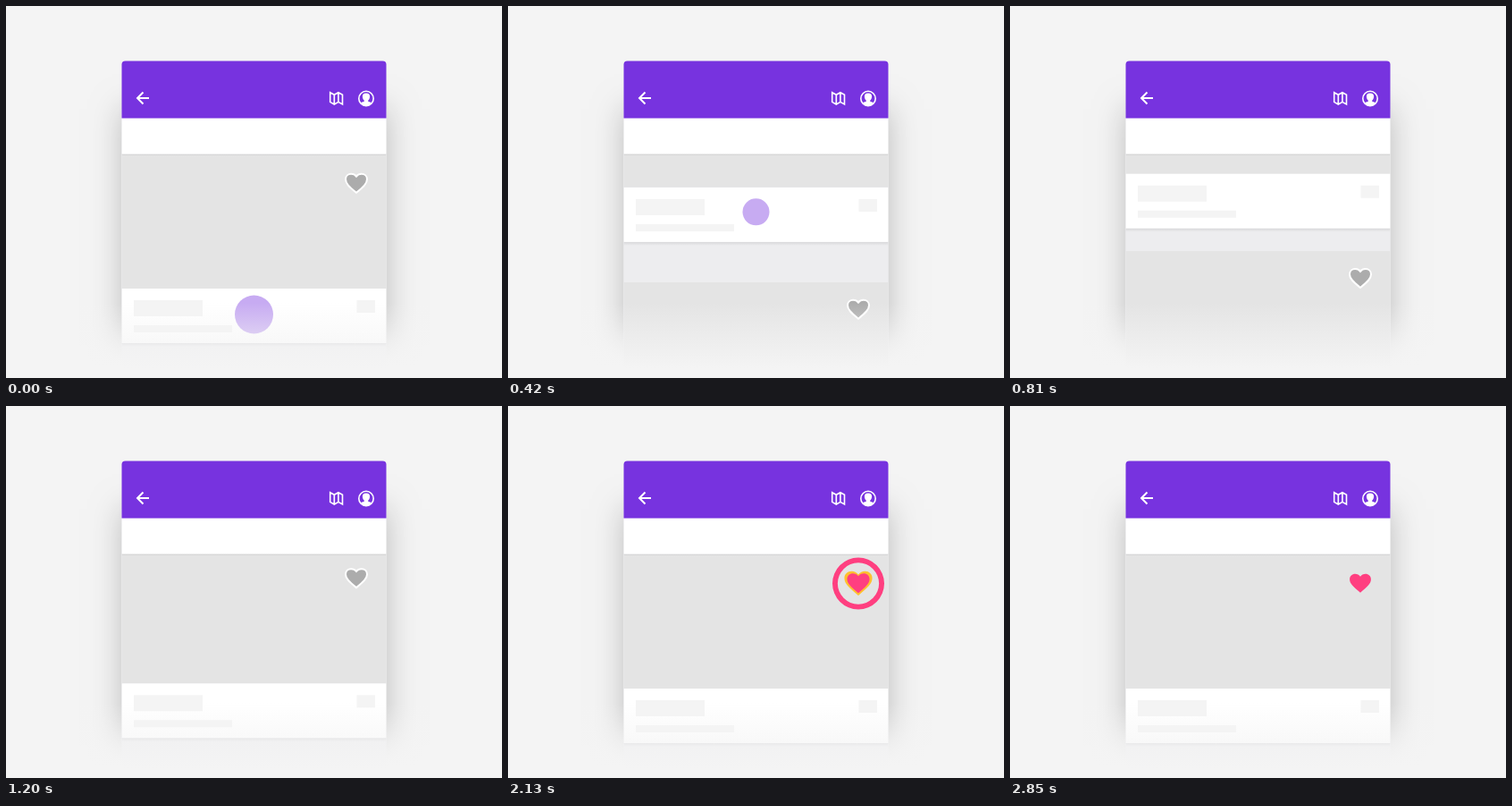
An HTML page with a canvas for the animation above (3630 ms loop, 555 px wide and 416 px high).

```html
<!DOCTYPE html>
<html lang="en">
<head>
<meta charset="utf-8">
<title>Like a card</title>
<style>
html, body { margin: 0; height: 100%; overflow: hidden; background: #f4f4f4; }
canvas { display: block; }
</style>
</head>
<body>
<canvas id="stage" width="555" height="416"></canvas>
<script>
const ctx = document.getElementById('stage').getContext('2d');
const LOOP = 3630, LEFT = 129.5, WIDTH = 296;
const PURPLE = '#7733df', PINK = '#ff3f80', YELLOW = '#ffc02e';
const HEART = { x: 392, y: 198 };
const heartPath = new Path2D('M0 10.8C-8 4-12 .6-12-4.2C-12-7.8-9.2-10.2-5.8-10.2C-3.5-10.2-1.3-9.1 0-7.4' +
  'C1.3-9.1 3.5-10.2 5.8-10.2C9.2-10.2 12-7.8 12-4.2C12 .6 8 4 0 10.8Z');

const ramp = (t, a, b) => Math.min(1, Math.max(0, (t - a) / (b - a)));
const ease = (t, a, b) => (1 - Math.cos(Math.PI * ramp(t, a, b))) / 2;
const easeOut = (t, a, b) => 1 - (1 - ramp(t, a, b)) ** 3;
const pop = t => t < 0 ? 0 : 1 - Math.exp(-0.006 * t) * Math.cos(0.015 * t);

// Dragged up, held, then released on a spring that overshoots slightly
function scroll(t) {
  if (t < 715) return -155 * ease(t, 157, 562);
  if (t > 1440) return 2 * (1 - ease(t, 1440, 1620));
  const u = t - 715, w = Math.PI / 725, d = 0.00604;
  return -155 * Math.exp(-d * u) * (Math.cos(w * u) + d / w * Math.sin(w * u));
}

function box(color, x, y, w, h) {
  ctx.fillStyle = color;
  ctx.fillRect(x, y, w, h);
}

function disc(x, y, r, color, alpha = 1) {
  ctx.globalAlpha = alpha;
  ctx.fillStyle = color;
  ctx.beginPath();
  ctx.arc(x, y, r, 0, 7);
  ctx.fill();
  ctx.globalAlpha = 1;
}

function heart(x, y, scale, color, outlined) {
  if (scale <= 0) return;
  ctx.save();
  ctx.translate(x, y);
  ctx.scale(scale, scale);
  ctx.fillStyle = color;
  ctx.fill(heartPath);
  if (outlined) {
    ctx.strokeStyle = '#fff';
    ctx.lineWidth = 2;
    ctx.stroke(heartPath);
  }
  ctx.restore();
}

function softEdge(y, size, alpha) {
  const g = ctx.createLinearGradient(0, y, 0, y + size);
  g.addColorStop(0, `rgba(0,0,0,${alpha})`);
  g.addColorStop(1, 'rgba(0,0,0,0)');
  box(g, LEFT, y, WIDTH, size);
}

function card(top, heartDrop, heartScale) {
  box('#e4e4e4', LEFT, top, WIDTH, 150);
  heart(HEART.x, top + heartDrop, heartScale, '#acacac', true);
  const y = top + 150;
  box('#fff', LEFT, y, WIDTH, 61);
  box('#f4f4f4', 143, y + 13, 77, 18);
  box('#f4f4f4', 143, y + 41, 110, 8);
  box('#f4f4f4', 392.5, y + 13, 20.5, 14);
  softEdge(y + 61, 4, 0.09);
}

function icons() {
  ctx.strokeStyle = '#fff';
  ctx.lineWidth = 2;
  ctx.stroke(new Path2D('M160 103H147.5M153.5 96.5L147 103L153.5 109.5'));
  ctx.lineWidth = 1.6;
  ctx.stroke(new Path2D('M362.7 96.7L367.3 99.3L371.9 96.7L376.5 99.3V110L371.9 107.4L367.3 110L362.7 107.4ZM367.3 99.3V110M371.9 96.7V107.4'));
  ctx.beginPath();
  ctx.arc(403, 103.5, 8.2, 0, 7);
  ctx.stroke();
  ctx.save();
  ctx.clip();
  ctx.fillStyle = '#fff';
  ctx.fill(new Path2D('M403 97.5C399.4 97.5 398.6 99.8 399 102.3C399.3 104.2 400.2 105.2 401 106C400.8 107.6 396.5 107.4 394.5 109.5V113H411.5V109.5C409.5 107.4 405.2 107.6 405 106C405.8 105.2 406.7 104.2 407 102.3C407.4 99.8 406.6 97.5 403 97.5Z'));
  ctx.restore();
}

function touches(t) {
  const drop = ease(t, 570, 700);
  if (drop < 1) {
    const r = 15 + 6.5 * (1 - ease(t, 0, 150)) + 6 * drop;
    disc(277.5, 345 - 137 * ease(t, 35, 560), r, PURPLE, 0.41 * (1 - drop));
  }
  if (t > 1630 && t < 1980) {
    const press = ease(t, 1630, 1800);
    disc(HEART.x, HEART.y + 1, 31 - 16 * press, PURPLE, 0.41 * press * (1 - ramp(t, 1860, 1980)));
  }
}

function burst(t) {
  const outer = 29 * easeOut(t, 1900, 2120), inner = 29 * easeOut(t, 2000, 2317);
  if (outer > inner) {
    ctx.fillStyle = PINK;
    ctx.beginPath();
    ctx.arc(HEART.x, HEART.y + 0.5, outer, 0, 7);
    ctx.arc(HEART.x, HEART.y + 0.5, inner, 0, 7);
    ctx.fill('evenodd');
  }
  if (t < 2300) heart(HEART.x, HEART.y, pop(t - 1930), YELLOW);
  heart(HEART.x, HEART.y, pop(Math.min(t, 2850) - 2020), PINK);
}

function draw(t) {
  box('#f4f4f4', 0, 0, 555, 416);
  ctx.save();
  ctx.shadowColor = 'rgba(0,0,0,.23)';
  ctx.shadowBlur = 32;
  box('#ededef', LEFT, 115, WIDTH, 265);
  ctx.restore();
  box('#ededef', LEFT, 115, WIDTH, 301);

  ctx.save();
  ctx.beginPath();
  ctx.rect(LEFT, 125, WIDTH, 291);
  ctx.clip();
  // The second card trails the first a little
  card(411 + scroll(t - 20), 30, 1);
  card(166 + scroll(t), 32, 1 - ease(t, 1830, 1940));
  softEdge(165.5, 2, 0.11);
  box('#fff', LEFT, 125, WIDTH, 40.5);
  ctx.restore();

  ctx.fillStyle = PURPLE;
  ctx.beginPath();
  ctx.roundRect(LEFT, 61.5, WIDTH, 64, [4, 4, 0, 0]);
  ctx.fill();
  icons();
  touches(t);
  burst(t);

  const fade = ctx.createLinearGradient(0, 332, 0, 405);
  fade.addColorStop(0, 'rgba(244,244,244,0)');
  fade.addColorStop(1, '#f4f4f4');
  box(fade, 0, 332, 555, 84);
}

const start = performance.now();
function frame() {
  draw((performance.now() - start) % LOOP);
  requestAnimationFrame(frame);
}
frame();
</script>
</body>
</html>
```
